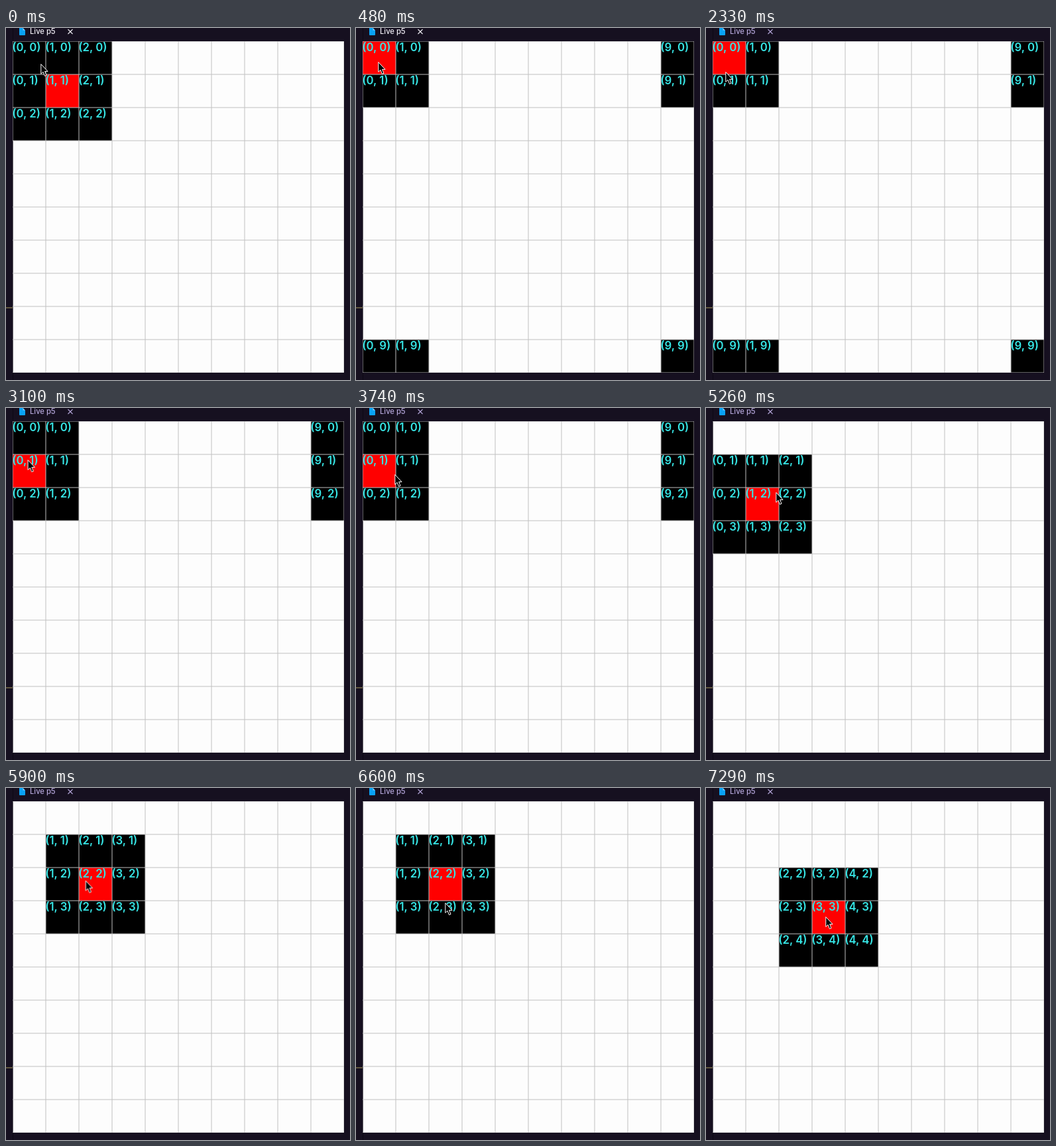
An HTML page that plays this animation: 519x531 px, repeating every 8 s.

```html
<!DOCTYPE html>
<html lang="en">
<head>
<meta charset="utf-8">
<title>Live p5</title>
<style>
  html, body { margin: 0; width: 100%; height: 100%; overflow: hidden; background: #161020; }
  svg { display: block; width: 519px; height: 531px; }
  text { font-family: Inter, "Liberation Sans", sans-serif; white-space: pre; }

  .label { font-size: 16.8px; font-weight: 600; fill: #36e4e4; }

  .tab { color: #f0eef6; animation: blur 8s step-end infinite; }
  .tab text { font-size: 11.2px; font-weight: 500; fill: currentColor; }
  .tab .close { stroke: currentColor; stroke-width: 1.1; }
  @keyframes blur { 9% { color: #b3a5d8; } 100% { color: #b3a5d8; } }

  .cursor { animation: move 8s step-end infinite; }
  @keyframes move {
    0%       { transform: translate(52px, 54px); }
    1.5%     { transform: translate(52px, 54px); animation-timing-function: steps(2, start); }
    3%       { transform: translate(33px, 51px); }
    21.75%   { transform: translate(33px, 51px); animation-timing-function: steps(9, start); }
    29.875%  { transform: translate(29px, 66px); animation-timing-function: steps(2, start); }
    31.125%  { transform: translate(30px, 76px); }
    38.75%   { transform: translate(30px, 76px); animation-timing-function: steps(12, start); }
    47.4375% { transform: translate(58px, 100px); animation-timing-function: steps(2, start); }
    48.875%  { transform: translate(63px, 101px); animation-timing-function: steps(3, start); }
    51.125%  { transform: translate(105px, 104px); }
    60%      { transform: translate(105px, 104px); animation-timing-function: steps(8, start); }
    66.375%  { transform: translate(105px, 127px); animation-timing-function: steps(3, start); }
    68.625%  { transform: translate(105px, 131px); }
    72.25%   { transform: translate(105px, 131px); animation-timing-function: steps(6, start); }
    76.625%  { transform: translate(134px, 148px); }
    81.875%  { transform: translate(134px, 148px); animation-timing-function: steps(2, start); }
    83.1%    { transform: translate(134px, 173px); animation-timing-function: steps(5, start); }
    86.75%   { transform: translate(136px, 194px); }
    89%      { transform: translate(136px, 194px); animation-timing-function: steps(4, start); }
    91.75%   { transform: translate(180px, 194px); }
    100%     { transform: translate(180px, 194px); }
  }
</style>
</head>
<body>
<svg viewBox="0 0 519 531">
  <defs><clipPath id="board"><path d="M10 20H510V520H10Z"/></clipPath></defs>
  <rect width="519" height="531" fill="#161020"/>
  <rect x="10" width="1" height="531" fill="#0d0915"/>
  <rect y="421.5" width="10" height="1" fill="#a8995a"/>

  <g class="tab">
    <path d="M20 0H25.5L29 3.5V10Q29 11 28 11H21Q20 11 20 10Z" fill="#0aa2f4"/>
    <path d="M25.5 0V3.5H29" fill="#7fd0fa"/>
    <text x="36" y="9">Live p5</text>
    <path class="close" d="M93.5 2L100.5 9M100.5 2L93.5 9"/>
  </g>

  <rect x="11" y="20" width="499" height="500" fill="#fdfdfd"/>
  <g id="cells" clip-path="url(#board)"></g>

  <g class="cursor">
    <path d="M.8 .5V15.3L4 12.3 6.5 18.4 9 17.3 6.6 11.4H11Z" fill="#000" stroke="#fff" stroke-linejoin="round"/>
  </g>
</svg>
<script>
  const LOOP = 8000, N = 10, SIZE = 50, LEFT = 10, TOP = 20;
  // start time, column and row of the selected cell
  const picks = [
    [0, 1, 1], [480, 0, 0], [2440, 0, 1], [3860, 1, 1],
    [5200, 1, 2], [5900, 2, 2], [6660, 2, 3], [7230, 3, 3]
  ];
  const board = document.getElementById('cells');

  function add(parent, tag, attrs, text) {
    const el = document.createElementNS('http://www.w3.org/2000/svg', tag);
    for (const key in attrs) el.setAttribute(key, attrs[key]);
    if (text) el.textContent = text;
    return parent.appendChild(el);
  }

  const wrap = i => (i + N) % N;

  function eachNeighbour(col, row, draw) {
    for (let dy = -1; dy <= 1; dy++)
      for (let dx = -1; dx <= 1; dx++)
        draw(wrap(col + dx), wrap(row + dy), !dx && !dy);
  }

  function showBetween(el, from, to) {
    const key = (opacity, time) => ({ opacity, offset: time / LOOP, easing: 'step-end' });
    const keys = [key(1, from), key(0, to)];
    if (from > 0) keys.unshift(key(0, 0));
    if (to < LOOP) keys.push(key(0, LOOP));
    el.animate(keys, { duration: LOOP, iterations: Infinity });
  }

  const groups = picks.map(() => [add(board, 'g', {})]);

  picks.forEach(([, col, row], i) => eachNeighbour(col, row, (c, r, picked) =>
    add(groups[i][0], 'rect', {
      x: LEFT + c * SIZE, y: TOP + r * SIZE,
      width: SIZE, height: SIZE, fill: picked ? '#f00' : '#000'
    })));

  // grid lines lie above the fills and below the labels
  let lines = '';
  for (let i = 0; i <= N; i++)
    lines += `M${LEFT + i * SIZE} ${TOP}v${N * SIZE}M${LEFT} ${TOP + i * SIZE}h${N * SIZE}`;
  add(board, 'path', { d: lines, stroke: '#c0c0c0', fill: 'none' });

  picks.forEach(([start, col, row], i) => {
    const labels = add(board, 'g', { class: 'label' });
    groups[i].push(labels);
    eachNeighbour(col, row, (c, r) => add(labels, 'text',
      { x: LEFT + c * SIZE - 0.8, y: TOP + r * SIZE + 14.5 }, `(${c}, ${r})`));
    const end = i + 1 < picks.length ? picks[i + 1][0] : LOOP;
    groups[i].forEach(g => showBetween(g, start, end));
  });
</script>
</body>
</html>
```
